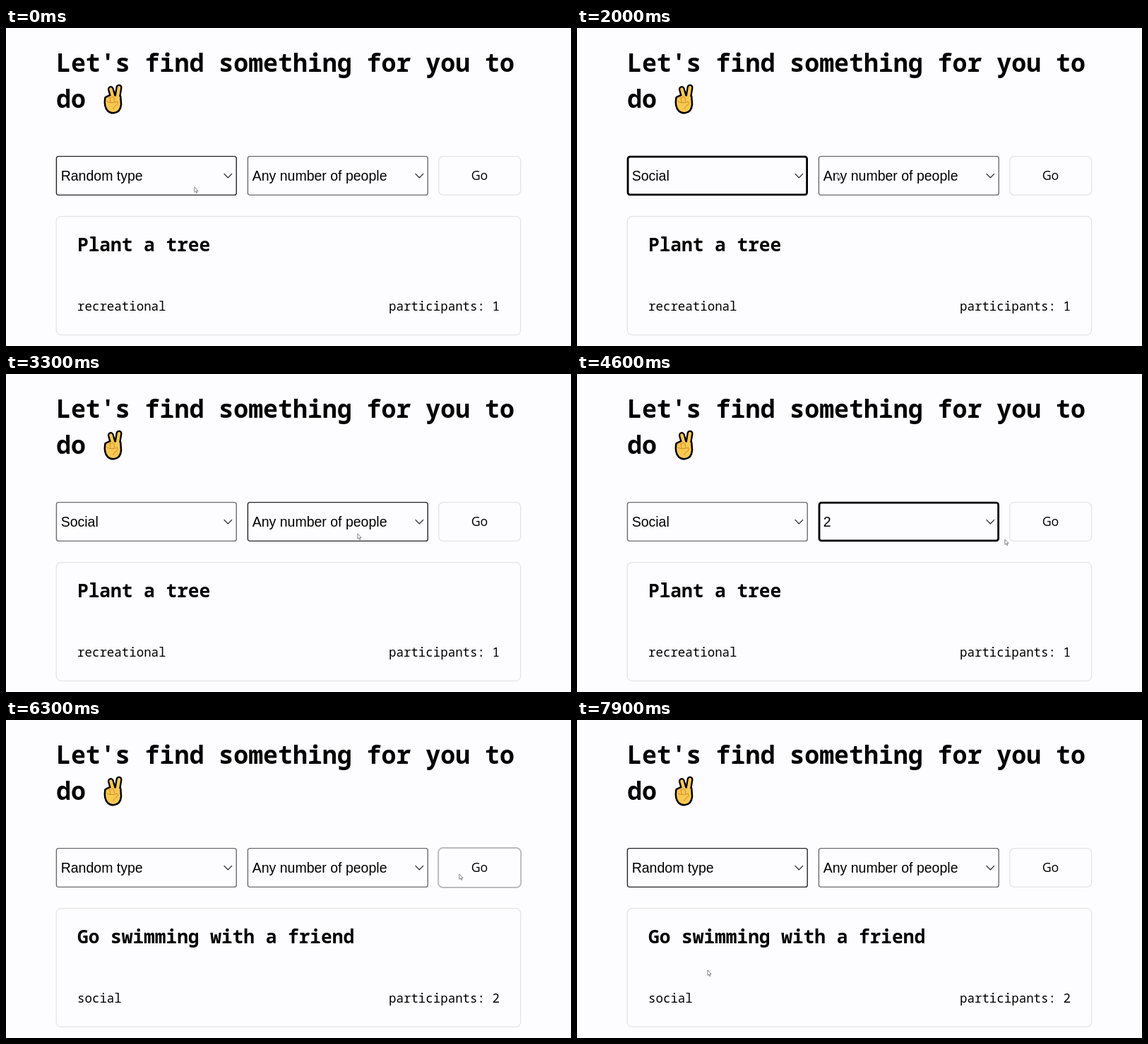
Write an HTML page that moves like this. It is 800 by 450 pixels and loops after 8000 ms.

```html
<!DOCTYPE html>
<html lang="en">
<head>
<meta charset="utf-8">
<title>Activity finder</title>
<style>
  html, body { margin: 0; width: 100%; height: 100%; overflow: hidden; background: #fdfcfe; }
  svg { display: block; width: 100vw; height: 100vh; }
  text { fill: #000; white-space: pre; font-family: "Noto Sans Mono", "DejaVu Sans Mono", monospace; }
  .h1 { font-size: 34.9px; font-weight: 640; }
  .h2 { font-size: 26.15px; font-weight: 640; }
  .body { font-size: 17.45px; font-weight: 460; }
  .pick { font: 19.5px "Liberation Sans", Arial, sans-serif; }
  .go { font: 500 17.8px "Open Sans", "Noto Sans", sans-serif; text-anchor: middle; }
  .panel { fill: none; stroke: #e4e3e6; stroke-width: 1.3; }
  .panel.lit { stroke: #bcbbbe; stroke-width: 2; }
  .field { fill: none; stroke: #6c6b6e; stroke-width: 1.4; }
  .field.active { stroke: #242326; }
  .field.ring { stroke: #000; stroke-width: 2.8; }
  .chevron { fill: none; stroke: #1c1c1c; stroke-width: 1.2; }
  .round { fill: none; stroke-linecap: round; stroke-linejoin: round; }
</style>
</head>
<body>
<svg viewBox="0 0 800 450">
  <defs>
    <path id="fingers" d="M151.6 98L148.4 86.6M157.6 99L160 84.2"/>
    <path id="palm" d="M141.6 99Q139.6 111 145 116.6Q148 119.3 152.5 119Q161 118 161.8 108L161 97L148 96Z"/>
  </defs>

  <text class="h1" x="71" y="62.2">Let's find something for you to</text>
  <text class="h1" x="71" y="113.2">do</text>

  <g class="round">
    <use href="#palm" stroke="#000" stroke-width="5"/>
    <use href="#fingers" stroke="#000" stroke-width="9"/>
    <use href="#fingers" stroke="#f9c851" stroke-width="4.4"/>
    <use href="#palm" fill="#f9c851"/>
    <path stroke="#d08a2c" stroke-width="1"
      d="M142.5 99Q144.5 96 147 98.5L148 104.5M148 98.5Q151 96 153 98.5L153.5 104M142.5 104Q150 107.5 157.5 104Q159.5 108 155 110Q152 112 152 114.5"/>
  </g>

  <g id="fields"></g>

  <rect class="panel" id="button" rx="6.5"/>
  <text class="go" x="670.5" y="215.4">Go</text>

  <rect class="panel" x="71.2" y="266.6" width="657.4" height="167.8" rx="7"/>
  <text class="h2" id="title" x="101" y="316.2"></text>
  <text class="body" id="kind" x="101" y="399.7"></text>
  <text class="body" id="people" x="542" y="399.7"></text>

  <path id="cursor" fill="#fff" stroke="#77767b" stroke-width="0.9" stroke-linejoin="round"
    d="M.9 .9V8.4L2.6 7L3.8 9.6L4.9 9.1L3.8 6.5H6Z"/>
</svg>

<script>
const LOOP = 8000, STEP = 100;
const $ = id => document.getElementById(id);

function makeField(x) {
  const g = document.createElementNS("http://www.w3.org/2000/svg", "g");
  g.setAttribute("transform", `translate(${x} 0)`);
  g.innerHTML = `<rect rx="3"/>
    <text class="pick" x="6.7" y="216"></text>
    <path class="chevron" d="M237.6 206.2L243.3 211.9L249 206.2"/>`;
  $("fields").append(g);
  return { box: g.querySelector("rect"), label: g.querySelector("text") };
}
const typeField = makeField(71), countField = makeField(342);

// Pointer stops: time, x, y
const path = [
  [0, 266, 224], [300, 262, 226], [900, 214, 318], [1400, 190, 388],
  [1700, 190, 406], [1800, 205, 392], [2000, 368, 205], [2500, 460, 222],
  [2900, 497, 225], [3400, 497, 225], [3900, 474, 296], [4200, 474, 300],
  [4600, 605, 233], [4900, 638, 219], [5100, 641, 217], [6300, 641, 217],
  [6800, 311, 198], [7100, 276, 212], [7300, 262, 226], [7900, 184, 353], [8000, 184, 353]
];

// Looks of each part: start time, value
const looks = {
  type: [[0, "Random type"], [1700, "Social"], [6300, "Random type"]],
  typeBox: [[0, "active"], [1700, "ring"], [2900, ""], [6700, "active"]],
  count: [[0, "Any number of people"], [4200, "2"], [6300, "Any number of people"]],
  countBox: [[0, ""], [2200, "active"], [4200, "ring"], [5000, ""], [6500, "active"], [6600, ""]],
  button: [[0, ""], [4800, "lit"], [6400, ""]],
  card: [
    [0, ["Plant a tree", "recreational", 1]],
    [6300, ["Go swimming with a friend", "social", 2]]
  ]
};

const at = (list, t) => list.findLast(item => item[0] <= t)[1];

function pointer(t) {
  const i = path.findIndex(p => p[0] > t);
  const [t0, x0, y0] = path[i - 1], [t1, x1, y1] = path[i];
  const k = (t - t0) / (t1 - t0), e = k * k * (3 - 2 * k);
  return [x0 + (x1 - x0) * e, y0 + (y1 - y0) * e];
}

// Places a 54.8 high box in the form row, shrunk by the inset on each side
function setBox(box, name, x, width, inset) {
  const size = { class: name, x: x + inset, y: 181.6 + inset, width: width - 2 * inset, height: 54.8 - 2 * inset };
  for (const key in size) box.setAttribute(key, size[key]);
}

function setField(field, text, look) {
  field.label.textContent = text;
  setBox(field.box, "field " + look, 0.4, 254.8, look === "ring" ? 0.6 : 0);
}

function draw() {
  const t = Math.floor(performance.now() % LOOP / STEP) * STEP;
  setField(typeField, at(looks.type, t), at(looks.typeBox, t));
  setField(countField, at(looks.count, t), at(looks.countBox, t));
  const lit = at(looks.button, t);
  setBox($("button"), "panel " + lit, 612.6, 116, lit ? -0.5 : 0);
  const [title, kind, people] = at(looks.card, t);
  $("title").textContent = title;
  $("kind").textContent = kind;
  $("people").textContent = "participants: " + people;
  $("cursor").setAttribute("transform", `translate(${pointer(t)})`);
  requestAnimationFrame(draw);
}
draw();
</script>
</body>
</html>
```
